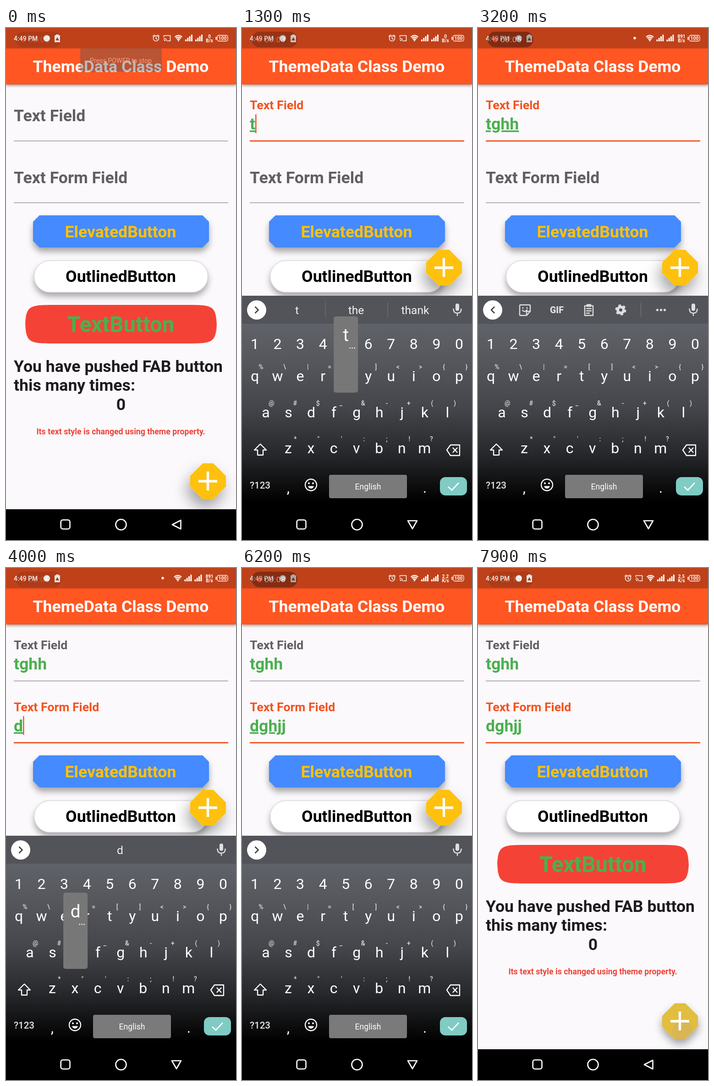
Animation of 502 by 1115 pixels, one loop 8 s. Source, as an HTML page:

```html
<!DOCTYPE html>
<html lang="en">
<head>
<meta charset="utf-8">
<title>Theme demo</title>
<style>
html, body { margin: 0; width: 100%; height: 100%; overflow: hidden; background: #fbf9fc; }
svg { display: block; width: 100%; height: 100%; font-family: Roboto, "Noto Sans", sans-serif; }
text { white-space: pre; }
.big { font-size: 35.6px; font-weight: 700; }
.typed { fill: #4caf50; text-decoration-skip-ink: none; }
.mid { text-anchor: middle; }
.line { fill: none; stroke: #fff; stroke-width: 2.3; stroke-linejoin: round; stroke-linecap: round; }
.key { font-size: 32px; fill: #fff; text-anchor: middle; }
.hint { font-size: 14px; font-weight: 500; fill: #dcdcde; text-anchor: end; }
.word { font-size: 24.6px; fill: #f1f1f2; text-anchor: middle; }
.icon { fill: none; stroke: #dedee0; stroke-width: 2.4; stroke-linejoin: round; stroke-linecap: round; }
.speed { font-size: 10px; font-weight: 700; fill: #fff; text-anchor: middle; }
</style>
</head>
<body>
<svg viewBox="0 0 502 1115" preserveAspectRatio="none">
  <defs>
    <linearGradient id="keysFill" gradientUnits="userSpaceOnUse" x1="0" y1="644" x2="0" y2="1048">
      <stop offset="0" stop-color="#5f6268"/>
      <stop offset=".2" stop-color="#55575c"/>
      <stop offset=".45" stop-color="#45464b"/>
      <stop offset=".7" stop-color="#27282b"/>
      <stop offset=".96" stop-color="#000"/>
    </linearGradient>
    <filter id="barShadow" x="-5%" y="-20%" width="110%" height="150%">
      <feDropShadow dx="0" dy="3" stdDeviation="2.5" flood-opacity=".35"/>
    </filter>
    <filter id="shadow" x="-20%" y="-30%" width="140%" height="190%">
      <feDropShadow dx="0" dy="9" stdDeviation="7" flood-opacity=".34"/>
    </filter>
    <filter id="fabShadow" x="-90%" y="-60%" width="280%" height="260%">
      <feDropShadow id="fabDrop" dx="0" dy="10" stdDeviation="10" flood-opacity=".36"/>
    </filter>
    <path id="octagon" d="M429.500 948H452.500L480 975.500V998.500L452.500 1026H429.500L402 998.500V975.500Z"/>
    <clipPath id="bodyClip"><rect id="bodyRect" width="502" height="1048"/></clipPath>
    <clipPath id="fabClip"><use href="#octagon"/></clipPath>
  </defs>
  <rect width="502" height="1115" fill="#fbf9fc"/>

  <g clip-path="url(#bodyClip)">
    <g id="fields"></g>
    <path d="M73 408H429L443 422V464L429 478H73L59 464V422Z" fill="#448aff" filter="url(#shadow)"/>
    <text class="big mid" x="250" y="456" fill="#ffc107">ElevatedButton</text>
    <rect x="61.5" y="506.5" width="379" height="69" rx="34.5" fill="#fff" filter="url(#shadow)"/>
    <rect x="61.5" y="506.5" width="379" height="69" rx="34.5" fill="none" stroke="#dad6dc" stroke-width="1.4"/>
    <text class="big mid" x="250.5" y="553">OutlinedButton</text>
    <path d="M42 673C42 603 42 603 112 603H390C460 603 460 603 460 673V617C460 687 460 687 390 687H112C42 687 42 687 42 617Z" fill="#f44336"/>
    <text class="mid" x="250.5" y="662" font-size="47.3" font-weight="700" fill="#4caf50">TextButton</text>
    <g class="big" fill="#1d1b1f">
      <text x="17" y="749">You have pushed FAB button</text>
      <text x="17" y="790">this many times:</text>
      <text class="mid" x="251" y="832">0</text>
    </g>
    <text class="mid" x="250.5" y="885" font-size="17.75" font-weight="700" fill="#ef4237">Its text style is changed using theme property.</text>
    <g id="fab">
      <use href="#octagon" fill="#ffc107" filter="url(#fabShadow)"/>
      <g id="press" clip-path="url(#fabClip)">
        <rect x="402" y="948" width="78" height="78" fill="#a5b3a5" fill-opacity=".32"/>
        <circle id="ripple" cx="446" cy="1009" r="23" fill="#d2b06a" fill-opacity=".5"/>
      </g>
      <path d="M420 987H461M440.5 966V1007" stroke="#fff" stroke-width="5.4"/>
    </g>
  </g>

  <rect y="44" width="502" height="79" fill="#ff5722" filter="url(#barShadow)"/>
  <rect width="502" height="44.5" fill="#bf411a"/>
  <text class="big mid" x="250.5" y="96" fill="#fff">ThemeData Class Demo</text>
  <g id="toast">
    <rect x="162" y="44" width="178" height="51" rx="4" fill="#505050" fill-opacity=".4"/>
    <text class="mid" x="250.5" y="76" font-size="14.2" fill="#ffab91" fill-opacity=".85">Press POWER to stop</text>
  </g>

  <g id="status">
    <g fill="#fff">
      <text x="17" y="28" font-size="14" font-weight="500">4:49 PM</text>
      <circle cx="89" cy="22.5" r="7"/>
      <path d="M106 16H109V14H115V16H118V31H106Z"/>
      <path d="M112 20L116 27H108Z" fill="#bf411a"/>
    </g>
    <g id="alerts" class="line" style="stroke-width:1.5">
      <circle cx="327.5" cy="22.5" r="6"/>
      <path d="M327.5 19V23L330 24.500M320.500 18L324 15M334.500 18L331 15"/>
      <path d="M344.500 19V16.500H358.500V28H352.500M344.500 22Q350 22.500 350.500 28M344.500 25.500Q347 26 347 28"/>
    </g>
    <circle id="dot" cx="342" cy="22" r="2.8" fill="#fff"/>
    <g id="signal">
      <path d="M376.500 29L368 18.500Q376.500 12 385 18.500Z" fill="#fff" fill-opacity=".35"/>
      <g class="line" style="stroke-width:2">
        <path d="M369 19Q376.500 13 384 19M371.500 22Q376.500 18.500 381.500 22M374 25Q376.500 23.500 379 25"/>
        <circle cx="376.500" cy="27.500" r=".6"/>
      </g>
      <g id="bars" fill="#fff"></g>
    </g>
    <text id="rate" class="speed" x="444" y="21.500"></text>
    <text id="unit" class="speed" x="444" y="31"></text>
    <rect x="461" y="16" width="23" height="12.500" rx="3.500" class="line" style="stroke-width:1.3"/>
    <path d="M458.500 20V25" class="line" style="stroke-width:2"/>
    <text class="mid" x="472.500" y="26" font-size="10.500" font-weight="700" fill="#fff">100</text>
  </g>
  <g id="pill">
    <rect x="21" y="8" width="100" height="34" rx="17" fill="#1c0804" fill-opacity=".82"/>
    <circle cx="38" cy="25.500" r="5.500" fill="#f4432c"/>
    <text id="clock" x="49" y="31" font-size="17" letter-spacing=".8" fill="#fff"></text>
  </g>

  <rect y="1048" width="502" height="67"/>
  <g id="keyboard">
    <rect y="583" width="502" height="62" fill="#535459"/>
    <rect y="644" width="502" height="404" fill="url(#keysFill)"/>
    <circle cx="32" cy="614" r="21" fill="#fff"/>
    <path id="chevron" fill="none" stroke="#3c3d41" stroke-width="2.500"/>
    <g id="tools">
      <path class="icon" d="M93 603H112Q114 603 114 605V617L106 626H93Q91 626 91 624V605Q91 603 93 603ZM114 617H108Q106 617 106 619V626M98 609V610.500M107 609V610.500M97 615Q102 620 107 614"/>
      <text class="mid" x="172" y="621" font-size="19.500" font-weight="900" fill="#dedee0">GIF</text>
      <path class="icon" d="M233 605H251V626H233ZM238 602.500H246V606H238ZM237 611H247M237 616H247M237 621H243"/>
      <circle cx="311.500" cy="614" r="6.500" fill="none" stroke="#dedee0" stroke-width="6"/>
      <circle cx="311.500" cy="614" r="10" fill="none" stroke="#dedee0" stroke-width="4" stroke-dasharray="5.236"/>
      <path d="M355.500 599V629" stroke="#77787d" stroke-width="1.200"/>
      <g fill="#dedee0"><circle cx="391.500" cy="614" r="2.600"/><circle cx="399.500" cy="614" r="2.600"/><circle cx="407.500" cy="614" r="2.600"/></g>
    </g>
    <g id="words">
      <path id="dividers" d="M182 597V630M318 597V630" stroke="#717277" stroke-width="1.200"/>
      <text class="word" x="120" y="623"></text>
      <text class="word" x="249" y="623"></text>
      <text class="word" x="378" y="623"></text>
    </g>
    <rect x="466" y="600" width="8" height="16" rx="4" fill="#dedee0"/>
    <path class="icon" d="M461.500 612Q461.500 621 470 621T478.500 612M470 621V626"/>
    <g id="keys"></g>
    <path class="line" d="M40 906L53 919H46V930H34V919H27Z"/>
    <path class="line" d="M447 919L455 908H475V931H455ZM460.500 914.500L469.500 924M469.500 914.500L460.500 924"/>
    <text class="mid" x="39.500" y="1003" font-size="20.500" font-weight="500" fill="#e6e6e6">?123</text>
    <text class="key" x="101" y="1012">,</text>
    <circle class="line" cx="150.500" cy="995" r="12.500"/>
    <circle cx="146" cy="991.500" r="2" fill="#fff"/><circle cx="155" cy="991.500" r="2" fill="#fff"/>
    <path d="M144 997.500H157Q155 1003 150.500 1003T144 997.500Z" fill="#fff"/>
    <rect x="190" y="973" width="170" height="51" rx="4" fill="#7a7a7b"/>
    <text class="mid" x="275" y="1005" font-size="17.600" fill="#fff">English</text>
    <text class="key" x="399" y="1012">.</text>
    <rect x="432" y="978" width="59" height="40" rx="12" fill="#80cbc4"/>
    <path d="M450 999L458 1006.500L473 990.500" fill="none" stroke="#fff" stroke-width="2.600"/>
    <g id="popup">
      <rect x="-26.500" y="-141" width="53" height="166" rx="5" fill="#777778"/>
      <text id="popChar" class="mid" y="-87" font-size="38.500" fill="#fff"></text>
      <g fill="#fff"><circle cx="9" cy="-72" r="1.300"/><circle cx="14" cy="-72" r="1.300"/><circle cx="19" cy="-72" r="1.300"/></g>
    </g>
  </g>
  <g class="line" style="stroke-width:2.600">
    <rect x="119.700" y="1071.200" width="19.800" height="19.800" rx="4.500"/>
    <circle cx="251" cy="1081.500" r="11.500"/>
    <path id="back"/>
  </g>
</svg>
<script>
const LOOP = 8000;
const OPEN = 550, CLOSE = 6300, TAP1 = 250, TAP2 = 3750, PRESS = 7700;
const GREY = [97, 95, 99], ORANGE = [244, 81, 30], RULE = [138, 136, 140];
const keystrokes = [
  [1300, 0, 't'], [1650, 0, 'g'], [1950, 0, 'h'], [2300, 0, 'h'],
  [4000, 1, 'd'], [4150, 1, 'g'], [4300, 1, 'h'], [4450, 1, 'j'], [4600, 1, 'j']
];
const ticks = [700, 1750, 2800, 3900, 5000, 6000, 6900, 7700];

const $ = id => document.getElementById(id);
const clamp = v => Math.min(1, Math.max(0, v));
const ramp = (t, start, length) => clamp((t - start) / length);
const easeOut = u => 1 - (1 - u) ** 3;
const smooth = u => u * u * (3 - 2 * u);
const mix = (a, b, u) => `rgb(${a.map((v, i) => Math.round(v + (b[i] - v) * u))})`;
const show = (el, on) => el.setAttribute('visibility', on ? 'visible' : 'hidden');
const set = (el, attrs) => { for (const k in attrs) el.setAttribute(k, attrs[k]); };

function add(parent, tag, attrs, text = '') {
  const el = document.createElementNS('http://www.w3.org/2000/svg', tag);
  set(el, attrs);
  el.textContent = text;
  parent.append(el);
  return el;
}

// Keys, with their symbols right-aligned above
const keyPos = {};
[['1234567890', '', 28, 699], ['qwertyuiop', '%\\|=[]<>{}', 28, 769],
 ['asdfghjkl', '@#$_&-+()', 52, 848], ['zxcvbnm', '*"\':;!?', 101, 926]
].forEach(([chars, hints, x0, y]) => [...chars].forEach((c, i) => {
  const x = x0 + i * 49.55;
  keyPos[c] = [x, y];
  add($('keys'), 'text', { class: 'key', x, y }, c);
  if (hints) add($('keys'), 'text', { class: 'hint', x: x + 18.5, y: y - 26 }, hints[i]);
}));

for (const x of [391, 413])
  for (let i = 0; i < 4; i++) {
    const h = 4 + i * 3.5;
    add($('bars'), 'rect', { x: x + i * 4.3, y: 29 - h, width: 3, height: h });
  }

const fields = ['Text Field', 'Text Form Field'].map((name, i) => {
  const g = add($('fields'), 'g', { transform: `translate(17 ${i * 134.5})` });
  return {
    label: add(g, 'text', { class: 'big' }, name),
    typed: add(g, 'text', { class: 'big typed', y: 221 }),
    rule: add(g, 'rect', { width: 468 }),
    caret: add(g, 'rect', { y: 188, width: 2.5, height: 41, fill: '#e8562c' })
  };
});

function drawFields(t) {
  const focus = t < TAP1 ? -1 : t < TAP2 ? 0 : 1;
  const marks = [TAP1, TAP2, CLOSE + 50, ...keystrokes.map(k => k[0])];
  const last = Math.max(...marks.filter(m => m <= t));
  const texts = ['', ''];
  for (const [at, field, c] of keystrokes) if (at <= t) texts[field] += c;

  fields.forEach((f, i) => {
    const up = smooth(ramp(t, i ? TAP2 : TAP1, 200));
    const lit = i ? up : up * (1 - ramp(t, TAP2, 150));
    const thick = 1.3 + 1.5 * lit;
    set(f.label, {
      transform: `translate(0 ${203 - 26 * up}) scale(${1 - .25 * up})`,
      fill: mix(GREY, ORANGE, lit)
    });
    set(f.rule, { y: 246 - thick / 2, height: thick, fill: mix(RULE, ORANGE, lit) });
    f.typed.textContent = texts[i];
    f.typed.style.textDecoration = focus === i && t < CLOSE + 50 ? 'underline' : 'none';
    show(f.caret, focus === i && Math.floor((t - last) / 500) % 2 === 0);
    f.caret.setAttribute('x', f.typed.getComputedTextLength());
  });
  return texts;
}

function drawKeyboard(t, texts) {
  const shown = easeOut(ramp(t, OPEN, 466)) * (1 - ramp(t, CLOSE, 260));
  const up = t >= OPEN && t < CLOSE;
  set($('keyboard'), { transform: `translate(0 ${70 * (1 - shown)})`, opacity: shown });
  $('bodyRect').setAttribute('height', up ? 583 : 1048);
  $('fab').setAttribute('transform', `translate(0 ${up ? -465 : 0})`);
  $('back').setAttribute('d', up ? 'M362 1073H382L372 1090.500Z' : 'M363 1081.500L381.500 1072V1091Z');

  const tools = t < 1300 || (t >= 2900 && t < 4000);
  show($('tools'), tools);
  show($('words'), !tools);
  $('chevron').setAttribute('d', tools ? 'M36 607L29 614L36 621' : 'M28.500 607L35.500 614L28.500 621');
  const first = t < TAP2;
  const words = t >= 5600 ? ['', '', ''] : first ? [texts[0], 'the', 'thank'] : ['', texts[1], ''];
  document.querySelectorAll('.word').forEach((el, i) => { el.textContent = words[i]; });
  show($('dividers'), first && !tools);

  const hit = keystrokes.find(([at]) => t >= at && t < at + 110);
  show($('popup'), hit);
  if (hit) {
    const [x, y] = keyPos[hit[2]];
    $('popup').setAttribute('transform', `translate(${x + .5} ${y})`);
    $('popChar').textContent = hit[2];
  }
}

function drawStatus(t) {
  const phase = t % 2000;
  const pulse = Math.min(ramp(phase, 0, 550), 1 - ramp(phase, 900, 500));
  $('pill').setAttribute('opacity', .12 + .83 * pulse);
  const secs = 2 + ticks.filter(at => at <= t).length;
  $('clock').textContent = '00:' + String(secs).padStart(2, '0');

  const busy = t >= 1500 && t < 4200;
  show($('alerts'), !busy);
  show($('dot'), busy);
  $('signal').setAttribute('transform', `translate(${busy ? -1.5 : 0} 0)`);
  $('rate').textContent = t < 1500 ? '0' : busy ? '891' : t < 7200 ? '2.2' : '2.5';
  $('unit').textContent = t < 4200 ? 'B/s' : 'K/s';
  $('toast').setAttribute('opacity', 1 - ramp(t, 80, 220));
}

// Pressing lowers the button, so its shadow tightens
function drawPress(t) {
  const down = ramp(t, PRESS, 150);
  $('press').setAttribute('opacity', down);
  $('ripple').setAttribute('r', 8 + 15 * ramp(t, PRESS, 200));
  set($('fabDrop'), { dx: -6 * (1 - down), dy: 18 - 8 * down, stdDeviation: 16 - 7 * down });
}

function draw(t) {
  drawKeyboard(t, drawFields(t));
  drawStatus(t);
  drawPress(t);
}

function frame() {
  draw(performance.now() % LOOP);
  requestAnimationFrame(frame);
}
frame();
</script>
</body>
</html>
```
